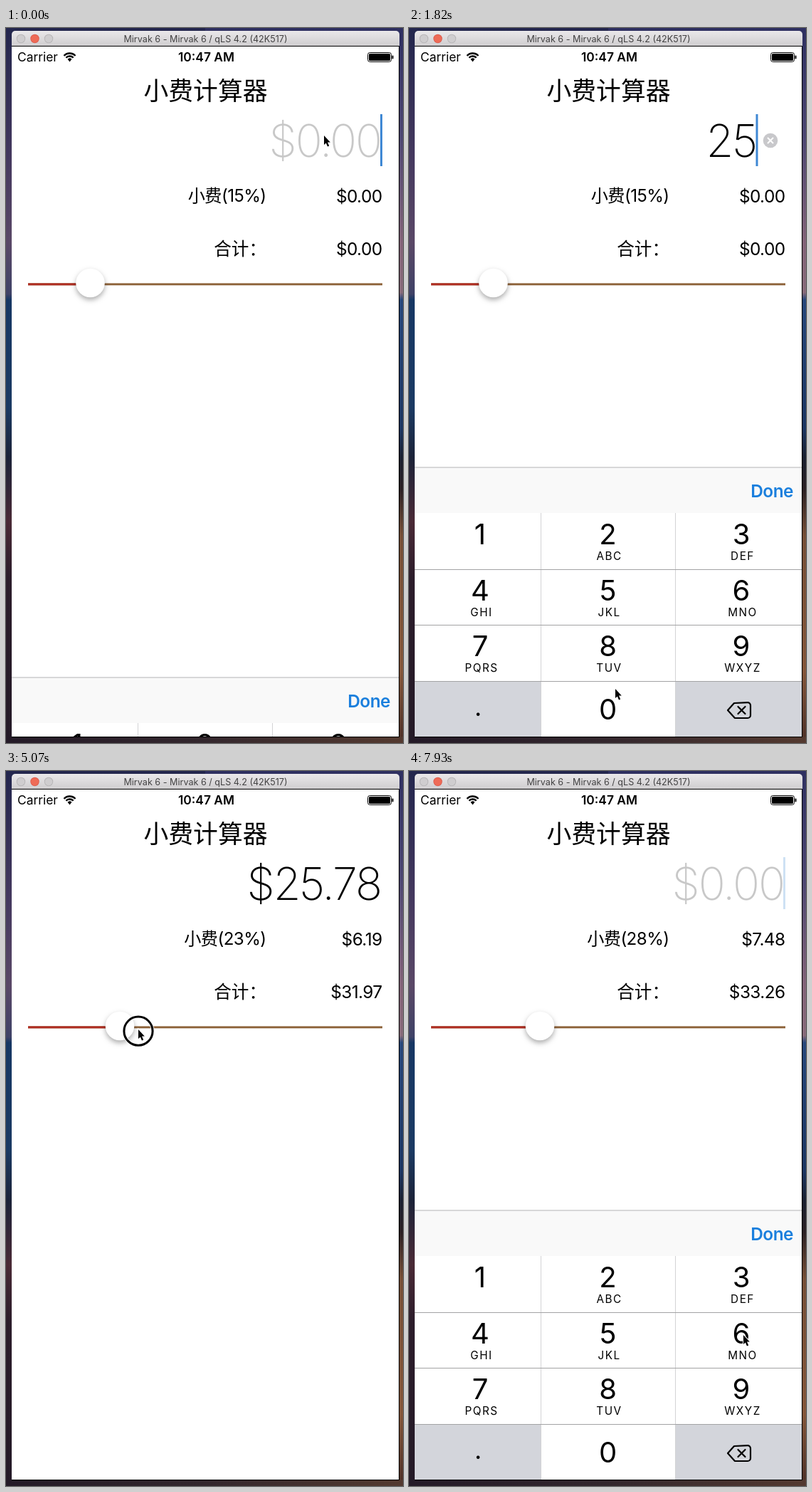
Recreate the animation shown at these times as an HTML page with a canvas. Size 558 by 1004 pixels, loop 8 s.

```html
<!DOCTYPE html>
<html lang="zh">
<head>
<meta charset="utf-8">
<style>
html, body { margin: 0; width: 100%; height: 100%; overflow: hidden; }
canvas { display: block; width: 558px; height: 1004px; }
</style>
</head>
<body>
<canvas id="stage" width="558" height="1004"></canvas>
<script>
const ctx = document.getElementById('stage').getContext('2d');
const LOOP = 8000, STEP = 130;
const SANS = 'Inter, "Noto Sans CJK SC", "Noto Sans CJK", sans-serif';
const CJK = '"Noto Sans CJK SC", "Noto Sans CJK", sans-serif';
const KEY_GRAY = '#d3d5db';
const KB_TOP = 617, KB_HEIGHT = 378, SCREEN_BOTTOM = 995, KB_LEAD = 37.5;
const COLS = [8, 186, 374, 552];
const LETTERS = ['', 'ABC', 'DEF', 'GHI', 'JKL', 'MNO', 'PQRS', 'TUV', 'WXYZ'];

// Pointer stops: time, x, y
const PATH = [
  [0, 447, 151], [390, 447, 151], [650, 451, 176],
  [1040, 262, 708], [1170, 262, 708], [1430, 282, 790], [1560, 282, 790],
  [1820, 290, 928], [2080, 120, 955], [2210, 120, 955],
  [2470, 110, 876], [2600, 110, 876], [2860, 223.7, 878], [2990, 223.7, 878],
  [3640, 508, 648], [3770, 508, 648], [4420, 122, 360], [4550, 119, 358],
  [4810, 128, 360], [4940, 160, 363], [5070, 186, 363], [5590, 285, 360],
  [5850, 272, 358], [6110, 211, 357], [6240, 196.5, 357.5], [6370, 184, 358],
  [6500, 184, 358], [6890, 446, 156], [7150, 447, 158], [7800, 470, 792], [8000, 470, 792]
];
// Presses: start, end, control
const PRESSES = [
  [1040, 1170, '2'], [1430, 1560, '5'], [2080, 2210, '.'], [2470, 2600, '7'],
  [2860, 2990, '8'], [3640, 3770, 'Done'], [4550, 6500, 'slider'], [6890, 7020, 'field']
];
const DONE_AT = 3770, DRAG_AT = 4550, EDIT_AT = 7020;

function pointer(t) {
  const i = Math.max(1, PATH.findIndex(p => p[0] > t));
  const [t0, x0, y0] = PATH[i - 1], [t1, x1, y1] = PATH[i];
  const u = (t - t0) / (t1 - t0);
  const k = Math.hypot(x1 - x0, y1 - y0) > 130 ? u * u * (3 - 2 * u) : u;
  return [x0 + (x1 - x0) * k, y0 + (y1 - y0) * k];
}

// The keyboard eases exponentially and rests on whole pixels
function keyboardTop(t) {
  const decay = s => Math.floor(KB_HEIGHT * Math.exp(-s / 152));
  if (t < DONE_AT) return KB_TOP + decay(t + KB_LEAD);
  if (t < EDIT_AT) return SCREEN_BOTTOM - decay(t - DONE_AT + KB_LEAD);
  return KB_TOP + decay(t - EDIT_AT);
}

function thumbX(t) {
  if (t < DRAG_AT + STEP) return 118.5;
  return pointer(Math.min(t - STEP, 6400))[0];
}

function caretAlpha(t, typed) {
  if (typed) return 1;
  const s = (t < DONE_AT ? t + KB_LEAD : t - EDIT_AT) % 1000;
  return s < 850 ? 1 : Math.max(0, 1 - (s - 850) / 80);
}

function text(str, x, y, size, { align = 'left', weight = 400, color = '#000', spacing = 0, family = SANS } = {}) {
  ctx.font = `${weight} ${size}px ${family}`;
  ctx.textAlign = align;
  ctx.fillStyle = color;
  ctx.letterSpacing = spacing + 'px';
  ctx.fillText(str, x, y);
}

function rect(x, y, w, h, color) {
  ctx.fillStyle = color;
  ctx.fillRect(x, y, w, h);
}

function disc(x, y, r, color) {
  ctx.fillStyle = color;
  ctx.beginPath();
  ctx.arc(x, y, r, 0, Math.PI * 2);
  ctx.fill();
}

function lines(width, color, ...paths) {
  ctx.lineWidth = width;
  ctx.strokeStyle = color;
  ctx.beginPath();
  for (const p of paths) p.forEach(([x, y], i) => i ? ctx.lineTo(x, y) : ctx.moveTo(x, y));
  ctx.stroke();
}

function gradient(x0, y0, x1, y1, stops) {
  const g = ctx.createLinearGradient(x0, y0, x1, y1);
  for (const [at, color] of stops) g.addColorStop(at, color);
  return g;
}

function drawDesktop() {
  rect(0, 0, 280, 1004, gradient(0, 0, 0, 1004, [
    [0, '#23264d'], [0.18, '#45395f'], [0.3, '#5a4867'], [0.372, '#3f4267'], [0.38, '#173764'],
    [0.53, '#1b3a63'], [0.6, '#1c2339'], [0.69, '#4a2a36'], [0.77, '#2c1d2b'], [1, '#241a27']]));
  rect(280, 0, 278, 1004, gradient(0, 0, 0, 1004, [
    [0, '#2e2f60'], [0.15, '#4c4672'], [0.3, '#836378'], [0.37, '#876a79'], [0.38, '#27477b'],
    [0.56, '#1b3561'], [0.6, '#1a2030'], [0.645, '#2b2023'], [0.71, '#764f37'], [0.9, '#84563a'], [1, '#4b2f27']]));
  rect(0, 995, 558, 9, gradient(0, 0, 558, 0, [[0, '#241a27'], [0.5, '#33272d'], [1, '#543a30']]));
}

function drawTitleBar() {
  ctx.fillStyle = gradient(0, 4, 0, 25, [[0, '#eae8ea'], [1, '#cfcdcf']]);
  ctx.beginPath();
  ctx.roundRect(8, 4, 545, 21, [5, 5, 0, 0]);
  ctx.fill();
  for (const [x, fill, edge] of [[21, '#cfcdcf', '#b3b1b3'], [40.5, '#ee6b57', '#d9574a'], [60, '#cfcdcf', '#b3b1b3']]) {
    disc(x, 15, 6.2, edge);
    disc(x, 15, 5.4, fill);
  }
  text('Mirvak 6 - Mirvak 6 / qLS 4.2 (42K517)', 280.5, 19.5, 12.6, { align: 'center', color: '#434243' });
  rect(8, 25, 545, 971, '#000');
  rect(8, 26, 544, 969, '#fff');
}

function drawStatusBar() {
  text('Carrier', 16, 47, 17.4);
  text('10:47 AM', 281.5, 47, 17.4, { align: 'center', weight: 600 });
  ctx.strokeStyle = '#000';
  ctx.lineWidth = 2.3;
  for (const r of [7, 11]) {
    ctx.beginPath();
    ctx.arc(89.5, 46.5, r, -Math.PI * 0.76, -Math.PI * 0.24);
    ctx.stroke();
  }
  ctx.fillStyle = '#000';
  ctx.beginPath();
  ctx.moveTo(89.5, 47.5);
  ctx.arc(89.5, 46.5, 4, -Math.PI * 0.76, -Math.PI * 0.24);
  ctx.fill();
  ctx.lineWidth = 1;
  ctx.beginPath();
  ctx.roundRect(508.5, 34.5, 33, 13, 3);
  ctx.stroke();
  ctx.beginPath();
  ctx.roundRect(510, 36, 30, 10, 1.5);
  ctx.roundRect(542.5, 38.5, 2, 5, 1);
  ctx.fill();
}

function drawAmount(t) {
  const editing = t < DONE_AT || t >= EDIT_AT;
  const typed = t < DONE_AT
    ? PRESSES.filter(p => p[2].length === 1 && p[1] <= t).map(p => p[2]).join('') : '';
  const value = !editing ? '$25.78' : typed || '$0.00';
  const color = editing && !typed ? '#c8c8c8' : '#000';
  text(value, typed ? 488 : 527, 181, 63, { align: 'right', weight: 150, color, spacing: -2 });
  if (!editing) return;
  ctx.globalAlpha = caretAlpha(t, typed);
  rect(typed ? 487.5 : 526, 121, 3, 73, '#3f88d4');
  ctx.globalAlpha = 1;
  if (typed) {
    disc(508, 158, 10.3, '#c8c8cb');
    lines(2, '#fff', [[504, 154], [512, 162]], [[512, 154], [504, 162]]);
  }
}

function drawTotals(t) {
  const percent = Math.round(24 + (thumbX(t) - 160) / 4.68);
  const shown = percent === 15 ? 15 : percent - 1;
  const bill = t < DONE_AT ? 0 : 25.78;
  const tip = Math.round(bill * percent) / 100;
  const row = { align: 'right', spacing: -0.6 };
  text(`小费(${shown}%)`, 365.5, 244, 24.2, row);
  text('$' + tip.toFixed(2), 528.5, 244.5, 24.4, row);
  text('合计：', 366, 318.5, 24.6, { align: 'right', family: CJK });
  text('$' + (bill + tip).toFixed(2), 528.5, 318.5, 24.4, row);
}

function drawSlider(t) {
  const x = thumbX(t);
  rect(31, 358.4, 498, 2.9, '#8d6239');
  rect(31, 358.4, x - 31, 2.9, '#b02c22');
  ctx.save();
  ctx.shadowColor = 'rgba(0,0,0,.32)';
  ctx.shadowBlur = 7;
  ctx.shadowOffsetY = 3.5;
  disc(x, 358, 20.3, '#fff');
  ctx.restore();
}

function drawDeleteIcon(x, y) {
  ctx.lineJoin = ctx.lineCap = 'round';
  ctx.lineWidth = 2.2;
  ctx.strokeStyle = '#000';
  ctx.beginPath();
  ctx.moveTo(x - 16, y);
  ctx.lineTo(x - 7, y - 10);
  ctx.arcTo(x + 16, y - 11, x + 16, y, 4);
  ctx.arcTo(x + 16, y + 11, x, y + 11, 4);
  ctx.lineTo(x - 6, y + 11);
  ctx.closePath();
  ctx.stroke();
  lines(2.2, '#000', [[x - 1.5, y - 5], [x + 8.5, y + 5]], [[x + 8.5, y - 5], [x - 1.5, y + 5]]);
  ctx.lineJoin = 'miter';
  ctx.lineCap = 'butt';
}

function drawKeyboard(top, pressed) {
  if (top >= SCREEN_BOTTOM) return;
  ctx.save();
  ctx.beginPath();
  ctx.rect(8, 26, 544, 969);
  ctx.clip();
  ctx.translate(0, top);
  rect(8, 0, 544, 64, '#f9f9f9');
  rect(8, -0.5, 544, 1, '#b4b4b6');
  text('Done', 540, 41.5, 24.4, {
    align: 'right', weight: 600, spacing: -0.5,
    color: pressed === 'Done' ? '#bcdaf5' : '#1a7fdd'
  });
  rect(8, 64, 544, 315, '#fff');

  const rowY = r => 64 + r * 78.7;
  const key = (col, row, color) => rect(COLS[col], rowY(row), COLS[col + 1] - COLS[col], 79, color);
  if (pressed !== '.') key(0, 3, KEY_GRAY);
  key(2, 3, KEY_GRAY);
  if (pressed >= '1' && pressed <= '9') {
    const n = pressed - 1;
    key(n % 3, Math.floor(n / 3), KEY_GRAY);
  }
  for (const x of [185, 374]) rect(x, 64, 1, 315, '#d3d3d5');
  for (let r = 1; r < 4; r++) rect(8, Math.round(rowY(r)), 544, 1, '#a3a3a4');

  const centers = [100, 279.5, 467];
  LETTERS.forEach((letters, i) => {
    const x = centers[i % 3], dy = Math.floor(i / 3) * 78.5;
    text(String(i + 1), x, 108 + dy, 40, { align: 'center' });
    text(letters, x + 2, 130 + dy, 15.3, { align: 'center', spacing: 1.5 });
  });
  text('0', 279.5, 354, 40, { align: 'center' });
  text('.', 97, 349, 32, { align: 'center', weight: 500 });
  drawDeleteIcon(464, 341);
  ctx.restore();
}

function drawPointer([x, y], pressed) {
  if (pressed) {
    for (const [width, color] of [[5, 'rgba(255,255,255,.75)'], [3, '#000']]) {
      ctx.lineWidth = width;
      ctx.strokeStyle = color;
      ctx.beginPath();
      ctx.arc(x, y + 2.2, 20.1, 0, Math.PI * 2);
      ctx.stroke();
    }
  }
  ctx.save();
  ctx.translate(x, y);
  ctx.beginPath();
  for (const [px, py] of [[0, 0], [0, 13], [2.8, 10.4], [5, 15.4], [7.2, 14.4], [5, 9.6], [8.8, 9.4]]) ctx.lineTo(px, py);
  ctx.closePath();
  ctx.lineWidth = 2;
  ctx.strokeStyle = '#fff';
  ctx.stroke();
  ctx.fillStyle = '#000';
  ctx.fill();
  ctx.restore();
}

function draw(t) {
  const pressed = (PRESSES.find(([a, b]) => t >= a && t < b) || [])[2] || '';
  drawDesktop();
  drawTitleBar();
  drawStatusBar();
  text('小费计算器', 280.5, 101, 34.8, { align: 'center', family: CJK });
  drawAmount(t);
  drawTotals(t);
  drawSlider(t);
  drawKeyboard(keyboardTop(t), pressed);
  drawPointer(pointer(t), pressed);
}

function tick() {
  const t = performance.now() % LOOP;
  draw(Math.floor(t / STEP) * STEP);
  requestAnimationFrame(tick);
}
tick();
</script>
</body>
</html>
```
